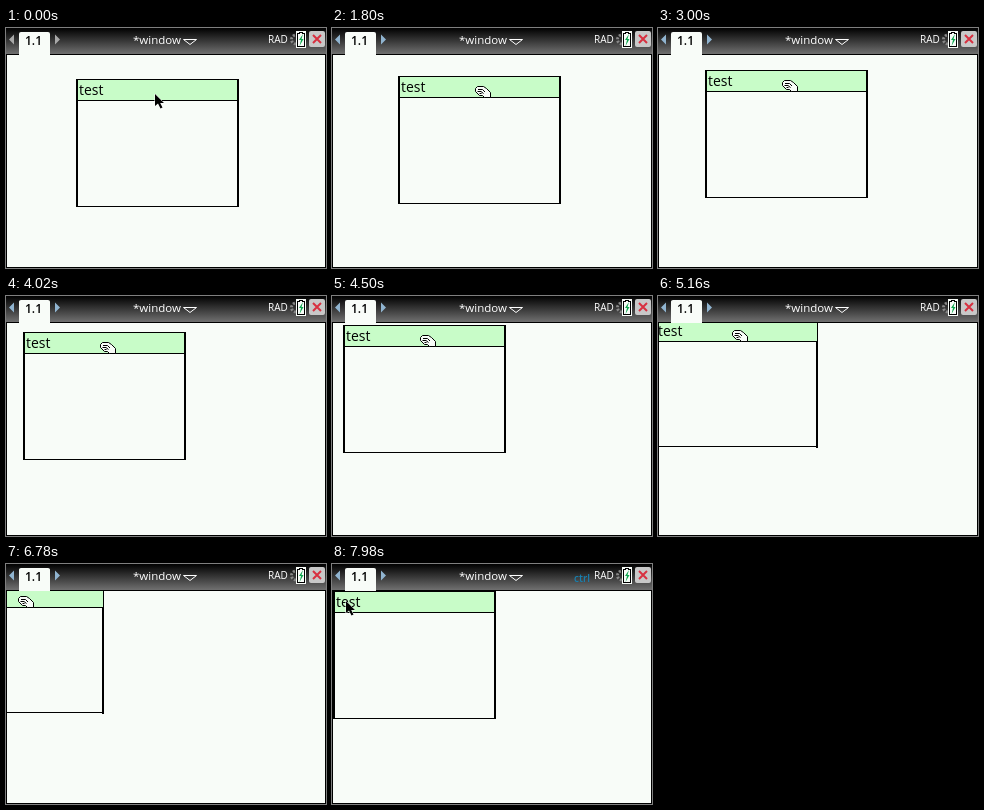
An HTML page that plays this animation: 320x240 px, repeating every 8 s.

```html
<!DOCTYPE html>
<html lang="en">
<head>
<meta charset="utf-8">
<title>Window dragging</title>
<style>
  html, body { margin: 0; width: 100%; height: 100%; overflow: hidden; background: #f8fcf8; }
  svg { display: block; width: 100vw; height: 100vh; }
  text { font-family: "Open Sans", "Noto Sans", sans-serif; }
  .crisp { shape-rendering: crispEdges; }
  .paper { fill: #f8fcf8; }
  .title { fill: #c8fcc8; }
</style>
</head>
<body>
<svg viewBox="0 0 320 240">
  <defs>
    <linearGradient id="bar" x1="0" y1="0" x2="0" y2="1">
      <stop offset="0" stop-color="#000"/>
      <stop offset="1" stop-color="#707070"/>
    </linearGradient>
    <clipPath id="page"><rect x="1" y="27" width="318" height="212"/></clipPath>
  </defs>

  <rect width="320" height="240"/>
  <rect class="crisp paper" x="1" y="27" width="318" height="212"/>

  <!-- Title bar -->
  <rect class="crisp" width="320" height="26" fill="url(#bar)"/>
  <path class="paper" d="M13 27V6q0-2 2-2h27q2 0 2 2v21z"/>
  <path id="tabs" d="M8 6.5v10L3 11.5zM49 6.5v10l5-5z"/>
  <text x="19" y="17" font-size="12" font-weight="600">1.1</text>
  <text x="127" y="16" font-size="11.5" fill="#fff">*window</text>
  <path d="M177.5 11.5h13l-6.5 5z" fill="none" stroke="#fff"/>
  <text id="ctrl" x="242" y="18" font-size="10" font-weight="600" fill="#1880b0">ctrl</text>
  <text x="262" y="15" font-size="10" fill="#fff">RAD</text>
  <circle cx="290" cy="11.5" r="4.5" fill="none" stroke="#888" stroke-width="3" stroke-dasharray="2 1.5"/>
  <g class="crisp">
    <path class="paper" d="M290 3h10v17h-10z"/>
    <path d="M291.5 5.5h2v-1h3v1h2v13h-7z" fill="none" stroke="#000"/>
  </g>
  <path d="M297 6l-4 6h2l-1.500 6 4-7h-2z" fill="#10a850"/>
  <rect x="303" y="3" width="16" height="16" rx="2" fill="#c8c8c8"/>
  <path d="M307 7l8 8m0-8l-8 8" stroke="#d83040" stroke-width="2"/>

  <g clip-path="url(#page)">
    <g id="win" class="crisp">
      <rect width="163" height="128"/>
      <rect class="title" x="2" y="1" width="159" height="20"/>
      <rect class="paper" x="2" y="22" width="159" height="105"/>
      <!-- Border when the window hangs over the page edge -->
      <g id="overhang">
        <path class="title" d="M161 1h1v20h-1z"/>
        <path class="paper" d="M0 127h161v1H0z"/>
        <path d="M0 126h161v1H0z"/>
      </g>
      <text x="3" y="16" font-size="14">test</text>
    </g>
  </g>

  <path id="arrow" d="M0 0V12L3 9.500 5.500 14.500 7.500 13.500 5.200 9H9z" stroke="#fff" paint-order="stroke"/>
  <g id="hand" stroke="#000" stroke-linejoin="round">
    <path class="paper" d="M2.500.5H8.500L11.500 2.500 15.500 6.500V11.500H9.500L7.500 9.500H4.500L.5 5.500V2.500z"/>
    <path d="M3 3.500H7.500L10 6M2.500 5.500H6L8.500 7.500M4.500 7.500H6.500" fill="none"/>
  </g>
</svg>

<script>
const LOOP = 8000, STEP = 60, GRAB = 780, DROP = 7920;
const PAGE = { left: 1, top: 27 };

// Each stroke moves the window's corner along a curve: from, to, curve
const strokes = [
  [1620, 1800, "M70 51L66 48"],
  [1800, 3000, "M66 48C58 43 50 46 50 56S62 90 78 90 105 84 105 66 72 44 47 42"],
  [3000, 3420, "M47 42Q33 40 32 27"],
  [3540, 4020, "M32 27Q32 36 17 36"],
  [4020, 4800, "M17 36Q13 28 6 27"],
  [4920, 5700, "M6 27L-3 24Q-23 22-3 26"],
  [6120, 6180, "M-3 26L-41 25"],
  [6180, 6360, "M-41 25L-65 24"],
  [6540, 6780, "M-65 24V22"]
].map(([from, to, d]) => {
  const curve = document.createElementNS("http://www.w3.org/2000/svg", "path");
  curve.setAttribute("d", d);
  return { from, to, curve };
});

const el = id => document.getElementById(id);
const [win, overhang, arrow, hand, ctrl, tabs] =
  ["win", "overhang", "arrow", "hand", "ctrl", "tabs"].map(el);
const place = (node, x, y) => node.setAttribute("transform", `translate(${x} ${y})`);
const show = (node, on) => node.setAttribute("visibility", on ? "visible" : "hidden");

function dragPoint(t) {
  const { from, to, curve } = strokes.filter(s => s.from <= t).pop() || strokes[0];
  const k = Math.min(1, Math.max(0, (t - from) / (to - from)));
  const p = curve.getPointAtLength(k * curve.getTotalLength());
  return [Math.round(p.x), Math.round(p.y)];
}

function draw(ms) {
  const t = Math.floor((ms % LOOP) / STEP) * STEP;
  const dragging = t >= GRAB && t < DROP;
  const [x, y] = dragPoint(t);
  const dropped = t >= DROP;
  const left = dropped ? Math.max(x, PAGE.left) : x;
  const top = dropped ? Math.max(y, PAGE.top) : y;
  place(win, left, top);
  place(hand, x + 77, y + 10);
  place(arrow, x + 79, y + 15);
  show(overhang, left < PAGE.left);
  show(hand, dragging);
  show(arrow, !dragging);
  show(ctrl, (t >= 360 && t < 1380) || t >= 7320);
  tabs.setAttribute("fill", t < STEP ? "#a8a8a8" : "#90b4d0");
}

const start = performance.now();
function tick() {
  draw(performance.now() - start);
  requestAnimationFrame(tick);
}
tick();
</script>
</body>
</html>
```
